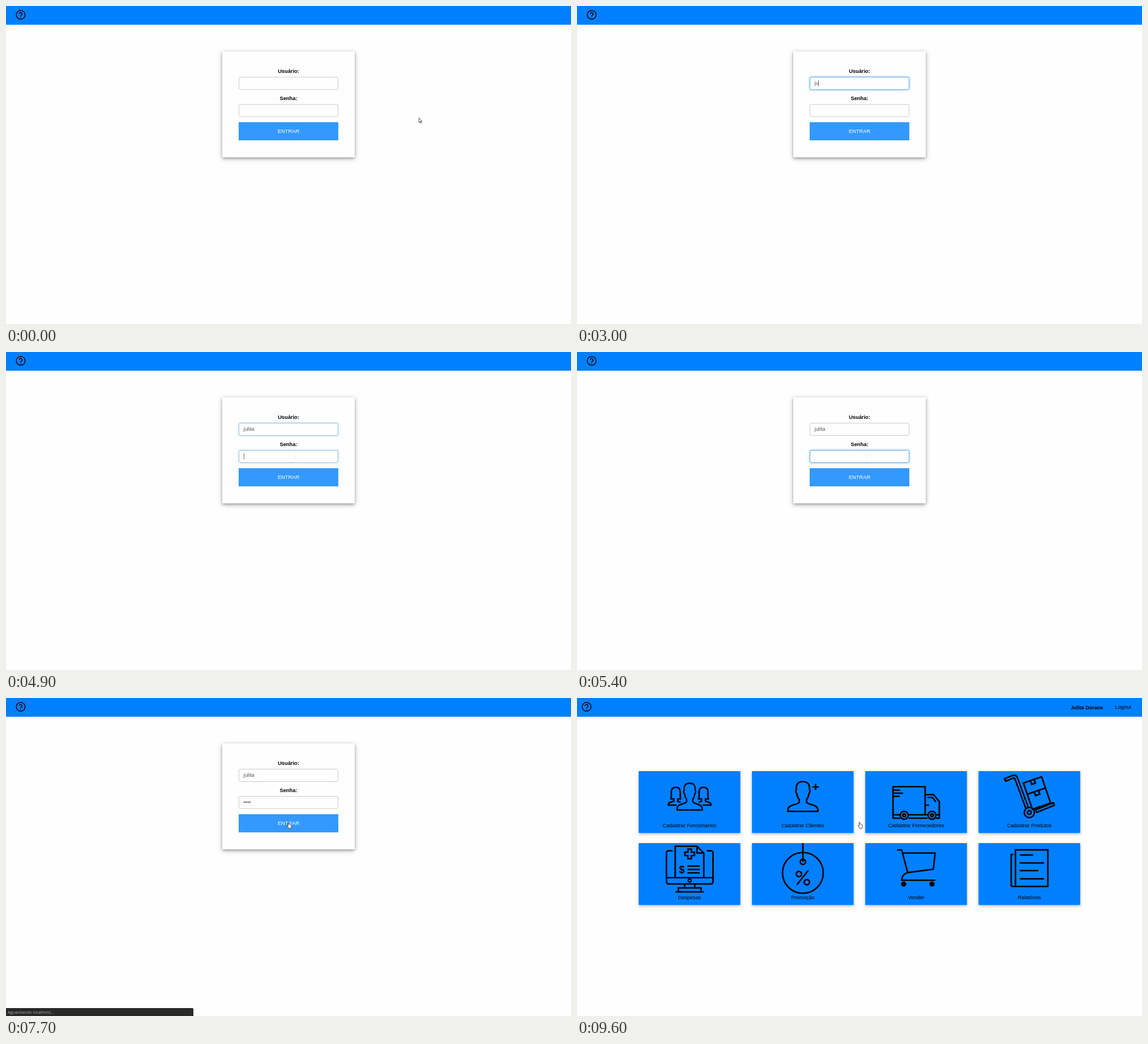
Write an HTML page that moves like this. It is 998 by 561 pixels and loops after 9800 ms.

```html
<!DOCTYPE html>
<html lang="pt-BR">
<head>
<meta charset="utf-8">
<title>Login</title>
<style>
html, body { margin: 0; width: 100%; height: 100%; overflow: hidden; background: #fefefe; }
svg { display: block; font: 9.3px "Liberation Sans", Arial, sans-serif; }
.mid { text-anchor: middle; }
.bold { font-weight: bold; }
.panel { fill: #fefefe; filter: drop-shadow(0 2.6px 2.6px rgba(0,0,0,.28)) drop-shadow(0 2px 5px rgba(0,0,0,.2)); }
.card { fill: #0080ff; filter: drop-shadow(0 2px 2.4px rgba(0,0,0,.3)); }
.field { fill: #fefefe; stroke: #ccc; }
.focus { fill: #fefefe; stroke: #66afe9; filter: drop-shadow(0 0 2px rgba(102,175,233,.75)); }
.typed { fill: #555; }
.icon { fill: none; stroke: #000; stroke-width: 2.7; }
.icon .solid { fill: #000; stroke: none; }
.icon .tube { stroke-width: 7.4; }
.icon .core { stroke: #0080ff; stroke-width: 2.2; }
.pointer { fill: #fff; stroke: #222; stroke-width: .8; stroke-linejoin: round; }
</style>
</head>
<body>
<svg width="998" height="561" viewBox="0 0 998 561">
  <defs>
    <path id="bust" d="M0 147.5C-8 147.5-12.5 152-11.5 161C-13.5 163-12.5 167-10.5 169C-10 174-8.5 177-6.5 179V184C-9 189-26.5 187-26.5 198V200H26.5V198C26.5 187 9 189 6.5 184V179C8.5 177 10 174 10.5 169C12.5 167 13.5 163 11.5 161C12.5 152 8 147.5 0 147.5Z"/>
    <path id="woman" d="M176 189H161.5C161 184.5 165 184 171 182V178H166C167.5 172 166.3 169 166.7 165C167 160 170 157.5 174.5 157.5S182 160 182.3 165C182.7 169 181.5 172 183 178H178V182L183 184"/>
  </defs>
  <rect width="998" height="33" fill="#0080ff"/>
  <g id="help" fill="none" stroke="#000" stroke-width="1.5">
    <circle r="7.8"/>
    <path d="M-2.5-1.6a2.5 2.5 0 1 1 3.6 2.3q-1.1.5-1.1 1.7M0 3.4v1.5"/>
  </g>

  <g id="login">
    <path class="panel" d="M382 80H616V267H382Z"/>
    <text class="mid bold" x="499" y="118.3">Usuário:</text>
    <text class="mid bold" x="499" y="166.2">Senha:</text>
    <rect class="field" x="411.5" y="125.5" width="175" height="22" rx="2.5"/>
    <rect class="field" x="411.5" y="173.5" width="175" height="21.5" rx="2.5"/>
    <rect class="focus" id="userFocus" x="411.5" y="125.5" width="175" height="22" rx="2.5"/>
    <rect class="focus" id="passFocus" x="411.5" y="173.5" width="175" height="21.5" rx="2.5"/>
    <text class="typed" id="user" x="419.6" y="139.3"></text>
    <text class="typed" id="pass" x="419.6" y="187.2"></text>
    <rect id="caret" width="1" height="11" fill="#777"/>
    <path id="beam" d="M511.5 179V190" stroke="#eee"/>
    <path fill="#3399ff" d="M411 205H587V237H411Z"/>
    <text class="mid" x="499" y="224.4" fill="#fff">ENTRAR</text>
  </g>

  <g id="menu">
    <text class="bold" x="872" y="20.2" font-size="9.05">Julita Dorane</text>
    <text x="950.5" y="19.3">Logout</text>
    <g id="cards" font-size="9.1"></g>
    <g class="icon">
      <use href="#woman"/>
      <use href="#woman" transform="matrix(-1 0 0 1 398 0)"/>
      <use href="#bust" fill="#0080ff" transform="matrix(.84 0 0 .9 199 17.5)"/>

      <use href="#bust" x="399"/>
      <path d="M421.5 151.5V162.5M416 157H427"/>

      <path d="M571 212H558.2V156.5H615V206M558 206H570M586 206H619M586 212H619M558 162.5H571M558 168H576M558 173.5H570M615 170.5H630L640 183V212H634M640 206H635M619 175.5H628L634 183.5M617 189H622"/>
      <circle cx="578" cy="207" r="7"/><circle cx="578" cy="207" r="2.3"/>
      <circle cx="627" cy="207" r="7"/><circle cx="627" cy="207" r="2.3"/>

      <g id="trolley">
        <path class="tube" d="M755 145L770 139Q774 138 775.5 141L795 194M810 200L843.5 186.5"/>
        <path class="core" d="M757.5 144L770 139Q774 138 775.5 141L795 194M812 199.2L841 187.5"/>
        <circle cx="799" cy="202" r="9" fill="#0080ff"/><circle cx="799" cy="202" r="3.4"/>
        <path transform="translate(788.5 150) rotate(-19)" d="M0 0H34V49H0ZM0 21H34M13 0V7H20V0M13 21V28H21V21"/>
      </g>

      <path d="M169 269.5H162Q158 269.5 158 274V323.5Q158 328 162 328H236Q240.3 328 240.3 323.5V274Q240.3 269.5 236 269.5H229M158 317H240M173.5 317V261.5H212L224 273.5V317M212 261.5V273.5H224M190 328V335M208 328V335M174 342H224M179 342V335H219V342M195 296.5H217M195 302.5H217M195 308.5H217"/>
      <path d="M196 266.5H202V272H207.5V278H202V283.5H196V278H190.5V272H196Z"/>
      <circle cx="199" cy="322" r="2.8" stroke-width="2"/>
      <text class="solid bold mid" x="185" y="308.5" font-size="18">$</text>

      <path d="M399 256V289M408.5 304L388.5 329.5"/>
      <circle cx="399" cy="308.5" r="36"/><circle cx="399" cy="289" r="4.7"/>
      <circle cx="392" cy="310.5" r="4.7"/><circle cx="406" cy="325" r="4.7"/>

      <path d="M565 268H573.5L584 307.5M575.5 273.5H632.5L629.5 302L584 308Q574 311 573.5 321.5H633"/>
      <circle class="solid" cx="577" cy="328.3" r="4.6"/><circle class="solid" cx="627" cy="328.3" r="4.6"/>

      <path d="M774.5 267.8H831.7V332.5H774.5ZM771 276H767V330Q767 332.5 770 332.5H775M782 277H806M782 291H825M782 304.5H815M782 319H825"/>
    </g>
  </g>

  <g id="status">
    <path d="M0 547H329Q331 547 331 549V561H0Z" fill="#292929"/>
    <text x="3" y="557" fill="#aaa" font-family="Open Sans, sans-serif" font-size="7.45">Aguardando localhost...</text>
  </g>
  <path id="arrow" class="pointer" d="M.4.4V8.4L2.1 6.9 3.5 9.8 4.7 9.2 3.4 6.4H5.9Z"/>
  <path id="hand" class="pointer" d="M2.4 7.6V1.5Q3.2.1 4 1.5V4.6Q5 4 5.4 5Q6.4 4.4 6.7 5.4Q8 5 8 6.4V9Q8 10.4 7.2 11V12.3H3.2V11.2L.5 7.8Q.2 6.6 1.2 6.7Z"/>
</svg>
<script>
const LOOP = 9800;
const $ = id => document.getElementById(id);
const show = (id, opacity) => $(id).style.opacity = Number(opacity);
const move = (id, x, y) => $(id).setAttribute('transform', `translate(${x} ${y})`);
const within = (t, ...spans) => spans.some(([from, to]) => t >= from && t < to);

// Value of the last key reached; each key is [time, ...value].
const keyAt = (t, keys) => keys.filter(k => k[0] <= t).pop().slice(1);
const typed = (t, text, times) => text.slice(0, times.filter(at => at <= t).length);

const labels = ['Cadastrar Funcionários', 'Cadastrar Clientes', 'Cadastrar Fornecedores', 'Cadastrar Produtos',
  'Despesas', 'Promoção', 'Vender', 'Relatórios'];
$('cards').innerHTML = labels.map((label, i) => {
  const x = 109 + i % 4 * 200.1, y = i < 4 ? 129 : 256;
  return `<rect class="card" x="${x}" y="${y}" width="179.5" height="109"/>
    <text class="mid" x="${x + 89.8}" y="${y + 98.6}">${label}</text>`;
}).join('');

const pointerKeys = [
  [0, 'arrow', 729, 197], [1900, 'arrow', 597, 168], [2000, 'arrow', 564, 155], [2100, 'none'],
  [4200, 'arrow', 543, 152], [4300, 'arrow', 532, 163], [4400, 'arrow', 520, 171], [4500, 'none'],
  [6600, 'arrow', 507, 195], [6700, 'hand', 502, 207], [6800, 'hand', 498, 214], [6900, 'hand', 496, 218]
];
const userFocus = [[0, 0], [2300, .5], [2400, 1], [4900, .5], [5000, 0]];
const passFocus = [[0, 0], [4900, .5], [5000, 1], [7300, 0]];
const statusKeys = [[0, 0], [7700, 1], [9500, .5], [9600, 0]];

function draw(t) {
  const home = t >= 9200;
  show('login', !home);
  show('menu', home);
  move('help', home ? 17 : 26, 15.5);

  $('user').textContent = typed(t, 'julita', [2800, 3000, 3200, 3300, 3600, 3700]);
  $('pass').textContent = typed(t, '••••', [5600, 5900, 6100, 6300]);
  show('userFocus', keyAt(t, userFocus)[0]);
  show('passFocus', keyAt(t, passFocus)[0]);

  const inPass = t >= 4900;
  const field = $(inPass ? 'pass' : 'user');
  const end = field.textContent ? field.getComputedTextLength() : 0;
  move('caret', Math.floor(420 + end - .5 * (end > 0)), inPass ? 178.5 : 131);
  show('caret', within(t, [2300, 4200], [4700, 5400], [5600, 6800]));
  show('beam', within(t, [4500, 6600]));

  const [shape, x, y] = keyAt(t, pointerKeys);
  for (const id of ['arrow', 'hand']) show(id, id === shape);
  if (shape !== 'none') move(shape, x, y);
  show('status', keyAt(t, statusKeys)[0]);
}

const start = performance.now();
function tick() {
  draw((performance.now() - start) % LOOP);
  requestAnimationFrame(tick);
}
tick();
</script>
</body>
</html>
```
